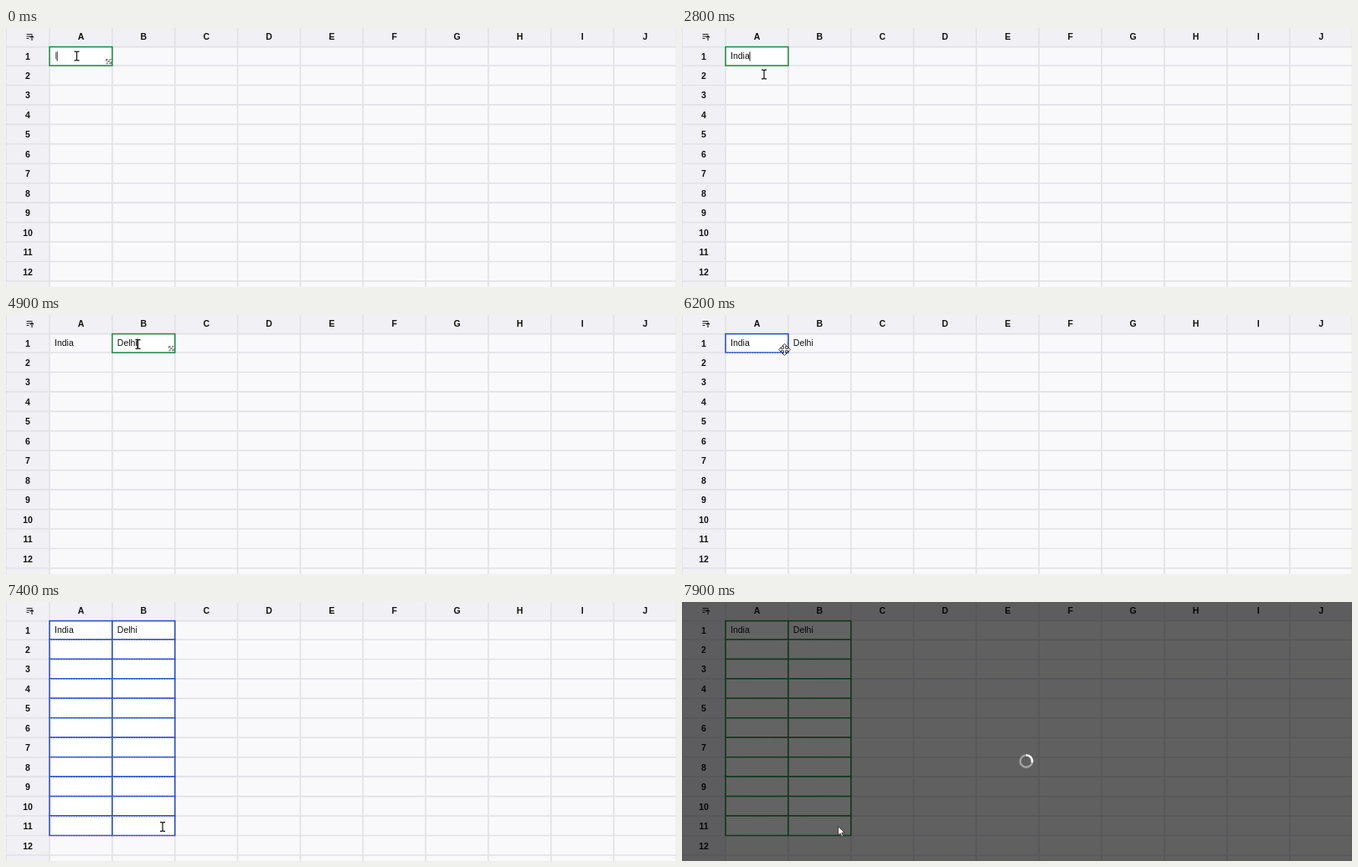
An HTML page that plays this animation: 800 by 310 pixels, repeating every 8 s.

```html
<!DOCTYPE html>
<html lang="en">
<head>
<meta charset="utf-8">
<title>Spreadsheet</title>
<style>
  html, body { margin: 0; width: 100%; height: 100%; overflow: hidden; background: #f9f9fc; }
  svg { display: block; }
  text { font: 10.5px "Liberation Sans", Arial, sans-serif; fill: #111; white-space: pre; }
  .head text { font-weight: bold; text-anchor: middle; }
  .cell { fill: #fff; stroke: currentColor; stroke-width: 1.5; }
  .dash { fill: none; stroke: #fff; stroke-opacity: .4; stroke-width: 1; stroke-dasharray: 1.5 1.5; }
  .green { color: #168a3e; }
  .blue { color: #2148c7; }
</style>
</head>
<body>
<svg id="stage" width="800" height="310" viewBox="0 0 800 310">
  <rect width="800" height="310" fill="#f9f9fc"/>
  <path d="M0 0H800V22H52V310H0Z" fill="#f0f0f5"/>
  <path id="grid" fill="none" stroke="#e1e1e6" stroke-width="1.6"/>
  <g class="head" id="head"></g>
  <path d="M24.5 7.5h7M24.5 10h5M24.5 12.5h3M31 15V9.5M29 11.3l2-2 2 2" fill="none" stroke="#222" stroke-width="1.1"/>
  <g id="cells"></g>
  <text id="textA" x="58" y="37.4"></text>
  <text id="textB" x="132.8" y="37.4"></text>
  <path id="caret" d="M0 28.3V39.5" stroke="#111"/>
  <g id="handle" fill="none" stroke="#555" stroke-width=".8">
    <path d="M-2.6 -2.2L2.6 2.4M-2.6 2.4L2.6 -2.2M-3 -.2V-2.6H-.8M.8 2.7H3V.2M.8 -2.6H3M-3 2.7H-.8"/>
  </g>
  <g id="overlay">
    <rect width="800" height="310" fill="#000" opacity=".61"/>
    <g transform="translate(411 190.6)" fill="none" stroke="#fff" stroke-width="2.4">
      <circle r="7.2" stroke-opacity=".42"/>
      <path id="arc" d="M0 -7.2A7.2 7.2 0 0 1 7 1.6"/>
    </g>
  </g>
  <g id="beam" fill="none" stroke="#111" stroke-width="1.2">
    <path d="M-3 -5.4H-1L0 -4.6L1 -5.4H3M0 -4.6V4.6M-3 5.4H-1L0 4.6L1 5.4H3"/>
  </g>
  <g id="move" fill="#fff" stroke="#222" stroke-width=".9" stroke-linejoin="round">
    <path id="moveShape"/>
  </g>
  <path id="arrow" d="M0 0V10.6L2.5 8.4L4.2 12.2L5.9 11.4L4.2 7.7H7.6Z" fill="#fff" stroke="#222" stroke-width=".8"/>
</svg>
<script>
const $ = id => document.getElementById(id);
const NS = "http://www.w3.org/2000/svg";
const LOOP = 8000, TICK = 100;
const colX = c => 52 + 74.85 * c;
const rowY = r => r ? 21.55 + 23.45 * r : 22.6;

function add(parent, tag, attrs, text) {
  const el = document.createElementNS(NS, tag);
  for (const k in attrs) el.setAttribute(k, attrs[k]);
  if (text) el.textContent = text;
  parent.append(el);
  return el;
}

let lines = "M0 0V310";
for (let c = 0; c <= 10; c++) {
  lines += `M${colX(c)} 0V310`;
  if (c < 10) add($("head"), "text", { x: colX(c) + 37.5, y: 13.5 }, "ABCDEFGHIJ"[c]);
}
for (let r = 0; r <= 12; r++) {
  lines += `M0 ${rowY(r)}H800`;
  if (r < 12) add($("head"), "text", { x: 26, y: 37.5 + 23.47 * r }, r + 1);
}
$("grid").setAttribute("d", lines);

// Four-way arrow built from one arm turned by quarter steps
let arms = "";
for (let q = 0; q < 4; q++) {
  const c = [1, 0, -1, 0][q], s = [0, 1, 0, -1][q];
  for (const [x, y] of [[-1.2, -1.2], [-1.2, -4], [-3, -4], [0, -7], [3, -4], [1.2, -4]])
    arms += `${arms ? "L" : "M"}${x * c - y * s} ${x * s + y * c}`;
}
$("moveShape").setAttribute("d", arms + "Z");

// Pointer stops: time, x, y
const path = [
  [0, 84.5, 33.5], [2200, 84.5, 33.5], [2700, 98, 55.5], [3400, 98, 55.5],
  [4000, 150, 50], [4600, 150, 50], [4900, 157.5, 35], [5200, 157.5, 35],
  [5500, 123, 36], [5800, 122.5, 41.5], [6300, 122.5, 41.5],
  [6900, 180, 200], [7300, 187, 269], [8000, 187, 269]
];
const typed = {
  A: { word: "India", at: [0, 400, 900, 1500, 2000] },
  B: { word: "Delhi", at: [3300, 3600, 3900, 4100, 4400] }
};

function pointer(t) {
  const i = path.findIndex(p => p[0] > t);
  const [t0, x0, y0] = path[i - 1], [t1, x1, y1] = path[i];
  const u = (t - t0) / (t1 - t0), e = u * u * (3 - 2 * u);
  return [x0 + (x1 - x0) * e, y0 + (y1 - y0) * e];
}

const show = (id, on) => $(id).style.display = on ? "" : "none";
const place = (id, x, y) => $(id).setAttribute("transform", `translate(${x} ${y})`);

function type(key, t) {
  const { word, at } = typed[key];
  $("text" + key).textContent = word.slice(0, at.filter(a => a <= t).length);
}

function drawCells(cls, c0, c1, rows) {
  const g = $("cells");
  g.replaceChildren();
  g.setAttribute("class", cls);
  for (let r = 0; r < rows; r++)
    for (let c = c0; c <= c1; c++)
      add(g, "rect", { class: "cell", x: colX(c), y: rowY(r), width: 74.85, height: rowY(r + 1) - rowY(r) });
  if (cls === "green" && rows === 1) return;
  for (let r = 1; r <= rows; r++)
    add(g, "path", { class: "dash", d: `M${colX(c0)} ${rowY(r) + .5}H${colX(c1 + 1)}` });
}

let last = -1;
function draw(t) {
  const [x, y] = pointer(t);
  const drag = t >= 6100, loading = t >= 7700, inB = t >= 3200;

  type("A", t);
  type("B", t);
  $("textA").setAttribute("opacity", t < 100 ? .6 : 1);

  if (drag) {
    const rows = Math.min(11, Math.max(1, Math.floor((y - 22) / 23.45) + 1));
    drawCells(loading ? "green" : "blue", 0, x > 127 ? 1 : 0, rows);
  } else {
    drawCells("green", +inB, +inB, 1);
  }

  const label = $(inB ? "textB" : "textA");
  const width = label.textContent ? label.getComputedTextLength() : 0;
  place("caret", (inB ? 132.8 : 58) + width + .2, 0);
  show("caret", t < 5600);

  const hoverCol = x < 127 ? 0 : 1;
  place("handle", colX(hoverCol) + 70.5, 40);
  show("handle", y < 45 && t < 6100);

  const moving = t >= 5800 && t < 7400;
  show("beam", !moving && !loading);
  show("move", moving);
  show("arrow", loading);
  place("beam", x, y);
  place("move", x, y);
  place("arrow", x - .5, y - .5);

  show("overlay", loading);
  $("arc").setAttribute("transform", `rotate(${(t - 7900) * .36})`);
}

function loop() {
  const t = Math.floor(performance.now() % LOOP / TICK) * TICK;
  if (t !== last) draw(last = t);
  requestAnimationFrame(loop);
}
loop();
</script>
</body>
</html>
```
